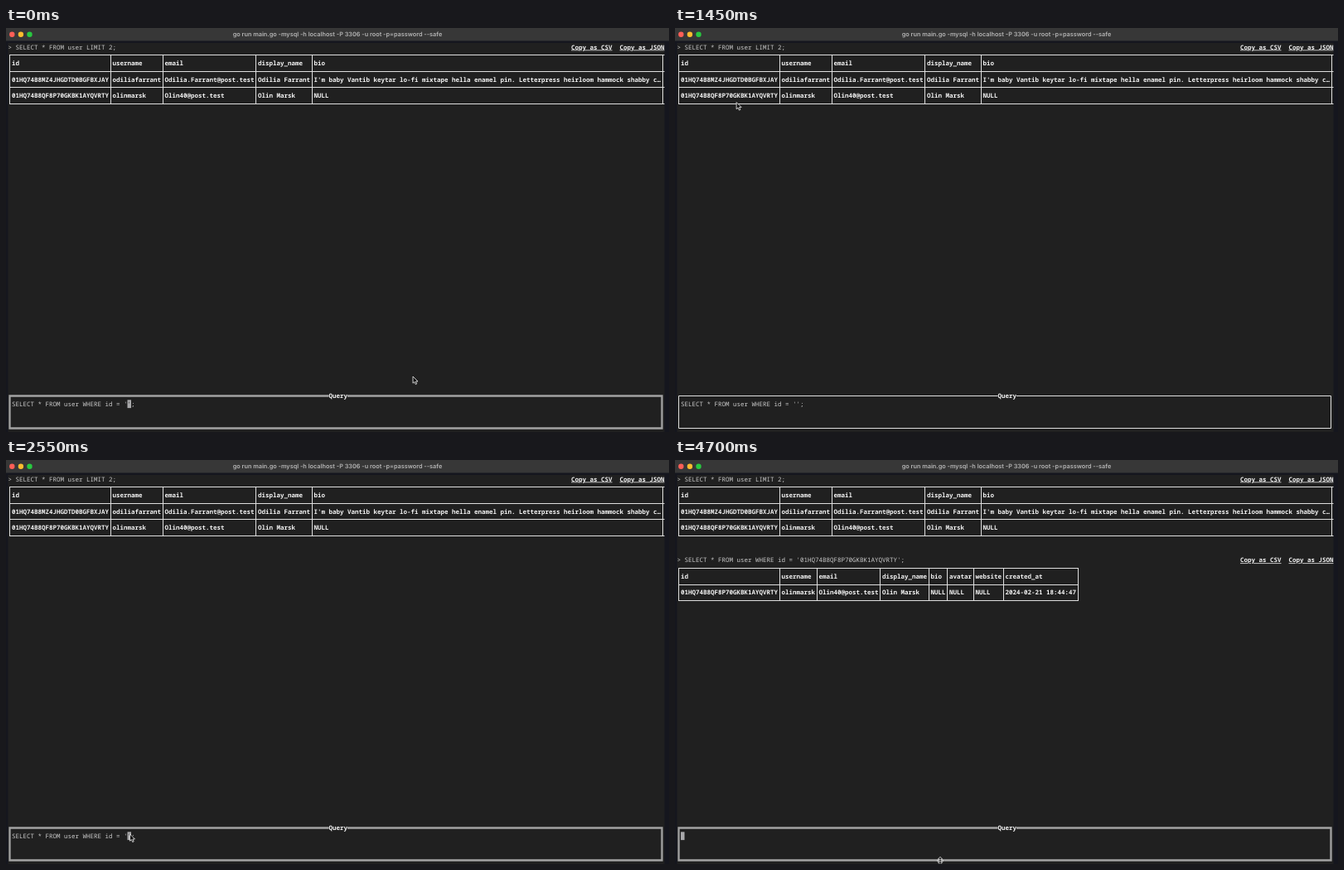
Recreate the animation shown at these times as an HTML page. Size 800 px wide and 487 px high, loop 4730 ms.

```html
<!DOCTYPE html>
<html lang="en">
<head>
<meta charset="utf-8">
<title>SQL terminal</title>
<style>
  html, body { margin: 0; width: 100%; height: 100%; overflow: hidden; background: #15161e; }
  svg { display: block; width: 800px; height: 487px; text-rendering: geometricPrecision; }
  .mono { font: 500 7.5px "Noto Sans Mono", "DejaVu Sans Mono", monospace; fill: #c9c9c9; }
  .bold { font-weight: 700; fill: #f2f2f2; }
  .link { text-decoration: underline; }
  .title { font: 600 7.3px Inter, sans-serif; fill: #b4b4b4; text-anchor: middle; }
  .line { fill: none; stroke: #dedede; stroke-width: 1; }
  .focus { fill: none; stroke: #a2a2a2; stroke-width: 2.3; }
</style>
</head>
<body>
<svg id="stage" viewBox="0 0 800 487"></svg>
<script>
const LOOP = 4730, CELL = 4.5, ROW = 9.78;
const stage = document.getElementById('stage');

const colX = c => 2.5 + c * CELL;
const rowY = r => 22.9 + r * ROW;
const snap = v => Math.floor(v) + 0.5;
const lineX = c => snap(colX(c) + CELL / 2);
const lineY = r => snap(rowY(r));

function add(parent, tag, attrs, text) {
  const el = document.createElementNS('http://www.w3.org/2000/svg', tag);
  for (const k in attrs) el.setAttribute(k, attrs[k]);
  if (text) el.textContent = text;
  parent.appendChild(el);
  return el;
}
const group = () => add(stage, 'g', {});
const show = (el, on) => el.setAttribute('visibility', on ? 'visible' : 'hidden');

function write(parent, col, row, text, cls = '') {
  return add(parent, 'text', { x: colX(col), y: rowY(row) + 2.6, class: 'mono ' + cls }, text);
}

function prompt(parent, row, sql) {
  write(parent, 0, row, '> ' + sql);
  write(parent, 151, row, 'Copy as CSV', 'bold link');
  write(parent, 164, row, 'Copy as JSON', 'bold link');
}

// borders: columns that hold vertical rules; cut: the grid runs on past the right edge
function table(parent, top, borders, rows, cut) {
  const last = borders[borders.length - 1];
  const right = cut ? 794.5 : lineX(last);
  const bottom = top + rows.length * 2;
  let d = '';
  for (let r = top; r <= bottom; r += 2) d += `M${lineX(0)} ${lineY(r)}H${right}`;
  for (const b of borders) d += `M${lineX(b)} ${lineY(top) - 0.5}V${lineY(bottom) + 0.5}`;
  add(parent, 'path', { d, class: 'line' });
  rows.forEach((cells, i) => cells.forEach((cell, j) =>
    write(parent, borders[j] + 1, top + 1 + i * 2, cell, 'bold')));
}

function queryBox(cls) {
  const l = lineX(0), r = lineX(175) - 1, t = lineY(43), b = lineY(47);
  return add(stage, 'path', { d: `M${colX(86)} ${t}H${l}V${b}H${r}V${t}H${colX(91)}`, class: cls });
}

// Window
add(stage, 'rect', { width: 800, height: 487, fill: '#15161e' });
add(stage, 'rect', { x: 2.5, y: 18, width: 792, height: 469, fill: '#202020' });
add(stage, 'rect', { width: 800, height: 15.5, fill: '#373737' });
['#ff5f57', '#febc2e', '#28c840'].forEach((fill, i) =>
  add(stage, 'circle', { cx: 7.3 + i * 10.6, cy: 7.8, r: 3.2, fill }));
add(stage, 'text', { x: 400, y: 10.3, class: 'title' },
  'go run main.go -mysql -h localhost -P 3306 -u root -p=password --safe');

// Results
const ID = '01HQ74B8QF8P70GKBK1AYQVRTY';
const USER = [ID, 'olinmarsk', 'Olin40@post.test', 'Olin Marsk', 'NULL'];
const HEAD = ['id', 'username', 'email', 'display_name', 'bio'];
const first = group(), second = group();
prompt(first, 0, 'SELECT * FROM user LIMIT 2;');
table(first, 1, [0, 27, 41, 66, 81, 175], [
  HEAD,
  ['01HQ74B8MZ4JHGDTD0BGFBXJAY', 'odiliafarrant', 'Odilia.Farrant@post.test', 'Odilia Farrant',
    "I'm baby Vantib keytar lo-fi mixtape hella enamel pin. Letterpress heirloom hammock shabby c…"],
  USER
], true);
prompt(second, 10, `SELECT * FROM user WHERE id = '${ID}';`);
table(second, 11, [0, 27, 37, 54, 67, 72, 79, 87, 107], [
  [...HEAD, 'avatar', 'website', 'created_at'],
  [...USER, 'NULL', 'NULL', '2024-02-21 18:44:47']
]);

// Query editor
const thin = queryBox('line'), thick = queryBox('focus');
write(stage, 86, 43, 'Query', 'bold');
const input = write(stage, 1, 44, '');
const caret = group();
add(caret, 'rect', { y: rowY(44) - ROW / 2, width: CELL, height: ROW, fill: '#a9a9ab' });
const caretChar = add(caret, 'text', { y: rowY(44) + 2.6, class: 'mono', style: 'fill:#202020' });

// Pointers, with the hot spot at 0,0
const arrow = add(stage, 'path', {
  d: 'M0 0V8.2L1.9 6.5L3.2 9.5L4.7 8.9L3.4 6H6Z',
  fill: '#111', stroke: '#f4f4f4', 'stroke-width': 0.8, 'stroke-linejoin': 'round'
});
const resize = add(stage, 'path', {
  d: 'M0 -4.6L2.6 -1.8H.8V-.7H3.4V.7H.8V1.8H2.6L0 4.6L-2.6 1.8H-.8V.7H-3.4V-.7H-.8V-1.8H-2.6Z',
  fill: '#111', stroke: '#f4f4f4', 'stroke-width': 0.8, 'stroke-linejoin': 'round'
});

// time, x, y
const PATH = [
  [0, 491, 420], [30, 491, 420], [150, 82, 64], [390, 82, 64], [560, 72.5, 82],
  [1430, 72.5, 82], [1670, 148, 432], [1940, 148, 432], [2300, 149.5, 451],
  [4360, 149.5, 451], [4680, 320, 483], [LOOP, 320, 483]
];
const CLICK_CELL = 940, CLICK_QUERY = 2490, PASTE = 2880, RUN = 3450, WAKE = 4360;

function pointerAt(t) {
  const i = Math.max(1, PATH.findIndex(p => p[0] > t));
  const [t0, x0, y0] = PATH[i - 1], [t1, x1, y1] = PATH[i];
  const u = (t - t0) / (t1 - t0), e = u * u * (3 - 2 * u);
  return [x0 + (x1 - x0) * e, y0 + (y1 - y0) * e];
}

function render(t) {
  const focused = t < CLICK_CELL || t >= CLICK_QUERY;
  const ran = t >= RUN;
  const before = "SELECT * FROM user WHERE id = '" + (t >= PASTE ? ID : '');
  show(thick, focused);
  show(thin, !focused);
  show(second, ran);
  input.textContent = ran ? '' : before + "';";
  show(caret, focused);
  caret.setAttribute('transform', `translate(${colX(ran ? 1 : 1 + before.length)})`);
  caretChar.textContent = ran ? '' : "'";

  const [x, y] = pointerAt(t);
  const visible = t < PASTE || t >= WAKE, edge = y > 480;
  for (const el of [arrow, resize]) el.setAttribute('transform', `translate(${x} ${y})`);
  show(arrow, visible && !edge);
  show(resize, visible && edge);
}

function tick() {
  render(performance.now() % LOOP);
  requestAnimationFrame(tick);
}
tick();
</script>
</body>
</html>
```
